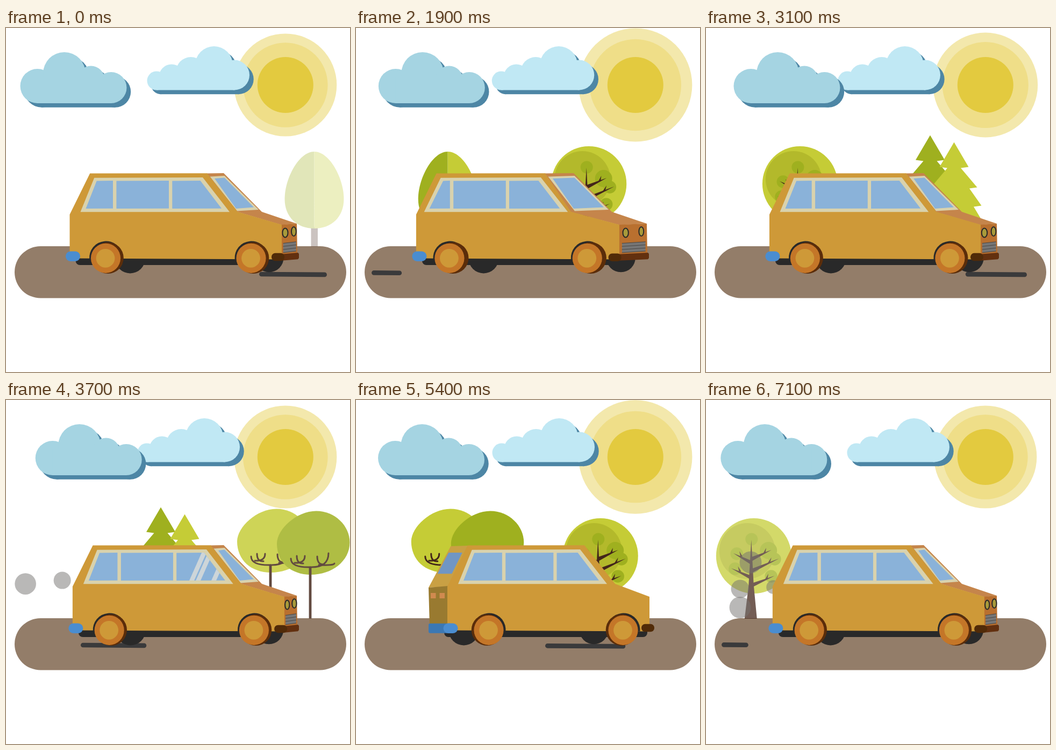
An HTML page with a canvas for the animation above (7.2 s loop, 640 by 640 pixels).

```html
<!DOCTYPE html>
<html lang="en">
<head>
<meta charset="utf-8">
<title>Road trip</title>
<style>
html, body { margin: 0; width: 100%; height: 100%; overflow: hidden; background: #fff; }
canvas { display: block; width: 640px; height: 640px; }
</style>
</head>
<body>
<canvas id="stage" width="640" height="640"></canvas>
<script>
const LOOP = 7200, STEP = 100, TAU = Math.PI * 2;
const stage = document.getElementById('stage').getContext('2d');
const layer = new OffscreenCanvas(640, 640).getContext('2d');
let g = stage;

const LEAF = '#9fb01f', LIME = '#c5cc36', BARK = '#43261a';
const PAINT = '#ce9938', GLASS = '#8ab2d9', CREAM = '#d9d2ad', BLACK = '#292929';

const clamp = (v, lo = 0, hi = 1) => Math.max(lo, Math.min(hi, v));
const smooth = v => (v = clamp(v), v * v * (3 - 2 * v));
const lerp = (a, b, k) => a + (b - a) * k;

// Piecewise linear track of [time, value] keys.
function track(keys, t) {
  const n = keys.findIndex(key => t < key[0]);
  if (n === 0) return keys[0][1];
  if (n < 0) return keys[keys.length - 1][1];
  const [t0, a] = keys[n - 1], [t1, b] = keys[n];
  return lerp(a, b, (t - t0) / (t1 - t0));
}

function disc(x, y, r, color) {
  g.fillStyle = color;
  g.beginPath();
  g.arc(x, y, r, 0, TAU);
  g.fill();
}
function outline(pts) {
  pts.forEach(([x, y], i) => i ? g.lineTo(x, y) : g.moveTo(x, y));
  g.closePath();
}
function poly(color, ...pts) {
  g.fillStyle = color;
  g.beginPath();
  outline(pts);
  g.fill();
}
function rect(x, y, w, h, color) {
  g.fillStyle = color;
  g.fillRect(x, y, w, h);
}
function pill(x, y, w, h, r, color) {
  g.fillStyle = color;
  g.beginPath();
  g.roundRect(x, y, w, h, r);
  g.fill();
}

// ---- sky ----
function sun(t) {
  const k = smooth(1 - Math.abs(t % 3600 - 1800) / 1800);
  disc(519.8, 106, 95.5 + 10.2 * k, '#f3e8ac');
  disc(519.8, 106, 78.8 + 6.5 * k, '#efde88');
  disc(519.8, 106, 52, '#e3ca3f');
}
function cloud(x, base, color, puffs) {
  const left = puffs[0][0], right = puffs[puffs.length - 1][0];
  for (const [d, fill] of [[7.7, '#4d86a5'], [0, color]]) {
    puffs.forEach(([px, py, r]) => disc(x + px + d, py + d, r, fill));
    rect(x + left + d, 92 + d, right - left, base - 92, fill);
  }
}
function clouds(t) {
  const k = 1 - Math.abs(t - 3600) / 3600;
  cloud(-18 * smooth(k), 115.5, '#c0e8f4',
    [[280, 98, 17.5], [308, 91, 23.5], [344, 82, 28], [387, 69, 35], [425, 87.5, 28]]);
  cloud(29 * k, 140, '#a5d4e2',
    [[58.5, 108, 32], [108.5, 84.5, 39.5], [158, 96, 25.5], [195.5, 111, 29]]);
}

// ---- road ----
function road(t) {
  pill(16, 406, 617, 96.5, 48.2, '#937d69');
  const beat = (t / 100 + 1.5) % 10.38 - 1.5;
  const head = track([[-1.5, 597], [0, 471], [7.8, 29]], beat) + 4.3;
  const tail = track([[0.6, 597], [9.5, 29]], beat) - 4.3;
  if (tail < head) return;
  g.strokeStyle = '#3a3a3b';
  g.lineWidth = 8.6;
  g.lineCap = 'round';
  g.beginPath();
  g.moveTo(head, 455.2 + head * 0.006);
  g.lineTo(tail, 455.3 + tail * 0.006);
  g.stroke();
}

// ---- trees, drawn around their own x origin ----
function eggTree() {
  rect(-6, 370, 12.5, 37, '#5b4236');
  for (const [w, color] of [[-55, LEAF], [55, LIME]]) {
    g.fillStyle = color;
    g.beginPath();
    g.moveTo(0, 230);
    g.bezierCurveTo(w * 0.52, 230, w, 280, w, 318);
    g.bezierCurveTo(w, 352, w * 0.58, 373, 0, 373);
    g.fill();
  }
}
function roundTree() {
  const boughs = [[318, 47, 295], [345, 39, 327], [296, 33, 279], [303, -38, 285], [331, -42, 313]];
  disc(0, 290, 70, LIME);
  disc(-12, 281, 52, '#b3b92b');
  disc(-4, 259, 11.5, LEAF);
  boughs.forEach(([root, x, y]) => disc(x * 0.83, y + 1, y < 280 ? 16 : 11.8, LEAF));
  poly(BARK, [-4.5, 260], [0, 345], [6, 407], [-17, 407], [-9.5, 345]);
  for (const [root, x, y] of boughs) {
    poly(BARK, [-4, root - 4], [x, y], [-4, root + 4]);
    const tx = x * 0.6, ty = lerp(root, y, 0.65);
    poly(BARK, [tx - 2, ty], [tx + x * 0.1, ty - 10], [tx + 2, ty]);
  }
}
function pine(x, y, color) {
  const right = [[0, 0]];
  for (const [w, h] of [[27, 46], [43, 84], [51, 118], [66, 169]])
    right.push([w, h], [w - 14.5, h + (h < 169 ? 2 : 0)]);
  const left = right.map(([a, b]) => [-a, b]).reverse();
  poly(color, ...right.concat(left).map(([a, b]) => [x + a, y + b]));
  rect(x - 4.8, 369.5, 9.6, 37, BARK);
}
function pines() {
  pine(0, 199.5, LEAF);
  pine(44.5, 212.5, LIME);
}
function bushTree(x, y, color) {
  g.save();
  g.translate(x, y);
  g.fillStyle = color;
  g.beginPath();
  g.moveTo(-62, 267);
  g.bezierCurveTo(-62, 240, -25, 206.5, 11, 206.5);
  g.bezierCurveTo(46, 206.5, 73.5, 234, 73.5, 265);
  g.bezierCurveTo(73.5, 300, 40, 325, 1, 325);
  g.bezierCurveTo(-36, 325, -62, 302, -62, 267);
  g.fill();
  g.strokeStyle = BARK;
  g.lineCap = 'round';
  g.lineWidth = 3;
  const limb = (x0, y0, x1, y1) => {
    g.beginPath();
    g.moveTo(x0, y0);
    g.quadraticCurveTo(x0, y1 + 1, x1, y1);
    g.stroke();
  };
  limb(-36, 295, 0, 311);
  limb(-25, 290, -13, 304);
  limb(-10, 290, -29, 303);
  limb(34, 285, 0, 311);
  limb(13, 291, 26, 306);
  limb(45, 304, 16, 307);
  rect(-2.4, 311, 4.8, 95.5 - y, BARK);
  g.restore();
}
function bushes() {
  bushTree(-74, -4, LIME);
  bushTree(0, 0, LEAF);
}

// One tree every 1200 ms: drawing, entry x, pixels per ms.
const trees = [[eggTree, 594.7, 0.212], [roundTree, 605.5, 0.2153], [pines, 589, 0.215],
  [bushes, 604.5, 0.1925], [roundTree, 605.5, 0.2153]];

function scenery(t) {
  trees.forEach(([draw, x, speed], n) => {
    const age = (t + 100 - n * 1200 + LOOP) % LOOP;
    if (age >= 2500) return;
    g = layer;
    g.clearRect(0, 0, 640, 640);
    g.save();
    g.translate(x - age * speed, 0);
    draw();
    g.restore();
    g = stage;
    g.globalAlpha = Math.min(smooth(age / 270), smooth((2600 - age) / 300));
    g.drawImage(layer.canvas, 0, 0);
    g.globalAlpha = 1;
  });
}

// ---- exhaust: final [x, y, radius] of each puff ----
const pair = [[29.5, 340, 20.5], [98, 333.5, 16.7]];
const group = [[83, 302, 20.5], [63.5, 351.5, 17], [63.5, 386, 20], [125, 348, 12.8]];

function smoke(t) {
  for (const [end, puffs] of [[1300, pair], [3750, pair], [6100, pair], [7100, group]]) {
    const back = (end - t) / 600;
    if (back < 0 || back >= 1) continue;
    for (const [x, y, r] of puffs)
      disc(x + 80 * back, y + 25 * back, r - 8 * back, 'rgba(117,115,112,.5)');
  }
}

// ---- van ----
// Turn: 1 shows the front, 0 is at rest, -1 is a plain side view, -2 shows the rear.
function turnAt(t) {
  return t < 3600
    ? track([[0, 0], [1300, 1], [1800, 0.75], [2500, 0.12], [3600, 0]], t)
    : -track([[0, 0], [100, 0.13], [1100, 1], [1800, 2]], 1800 - Math.abs(t - 5400));
}

function rearFace(back, roof, open) {
  const edge = back - 35 * open, top = roof - 31.5 * open;
  const inside = (k, h) => [lerp(lerp(edge, back, k), lerp(top, roof, k), h), 348 - 77 * h];
  poly('#c9a044', [edge, 349], [top, 272], [roof, 271], [back + 1, 347]);
  poly('#997a30', [edge, 349], [back + 1, 346], [back + 1, 430], [edge + 2, 420]);
  poly('#7096c4', inside(0.1, 0.83), inside(0.89, 0.83), inside(0.89, 0.32), inside(0.1, 0.32));
  for (const x of [4, 20.5]) rect(edge + x * open, 359, 9.5 * open, 10, '#d08a4f');
}

function frontFace(nose, far, roof, hood, front) {
  const top = Math.max(roof, 405), base = Math.max(hood, 476), width = far - nose;
  const corner = hood - 1 + 12 * front;
  poly('#c5854b', [roof - 1, 270.5], [top, 270], [base, 342], [far, 364], [nose, 366.5], [hood - 1, 342]);
  poly(CREAM, [roof + 5.5, 276.5], [top + 1.5, 275], [base - 6, 338], [corner, 340.5]);
  poly(GLASS, [roof + 14, 280], [top + 1.5, 278.4], [base - 15, 333.5], [corner - 2, 336]);
  poly('#b9702f', [nose - 1, 366], [far, 364], [far + 1, 418], [nose - 1, 430]);

  const gl = nose + width * 0.1, gr = nose + width * 0.95;
  poly('#767676', [gl, 400.5], [gr, 397.5], [gr, 415.5], [gl, 418]);
  g.strokeStyle = '#45413e';
  g.lineWidth = 0.9;
  g.beginPath();
  for (let y = 0; y < 18; y += 5.8) {
    g.moveTo(gl, 400.5 + y);
    g.lineTo(gr, 397.7 + y);
  }
  g.stroke();
  g.strokeStyle = BLACK;
  g.lineWidth = 2;
  g.fillStyle = '#a89a3a';
  for (const [k, y, r] of [[0.23, 381, 5.2], [0.8, 378.5, 4.4]]) {
    g.beginPath();
    g.ellipse(nose + width * k, y, Math.min(r, width * 0.18), 8.6, 0, 0, TAU);
    g.fill();
    g.stroke();
  }
}

function sideWindows(t, back, roofA, roofB, hood, front, swing) {
  const tl = roofA + 8, tr = roofB - 8;
  const bl = back + 20 - 8 * front, br = hood - 15 + 14 * front;
  poly(CREAM, [tl, 278.7], [tr, 278], [br, 342.2], [bl, 342.2]);

  const left = bl + 10, right = br - 15;
  const bar1 = lerp(left, right, 0.2 - 0.085 * swing), bar2 = lerp(left, right, 0.612 - 0.052 * swing);
  const pane = (a, b, c, d) => [[a, 284.5], [b, 284], [c, 335.8], [d, 336]];
  const panes = [pane(tl + 4.5, bar1, bar1, left), pane(bar1 + 6.4, bar2, bar2, bar1 + 6.4),
    pane(bar2 + 6.2, tr - 4.5, right, bar2 + 6.2)];
  panes.forEach(p => poly(GLASS, ...p));

  // reflection sweeping across the glass
  if (Math.abs(t - 3700) > 300) return;
  g.save();
  g.beginPath();
  panes.forEach(outline);
  g.clip();
  for (const dx of [0, 12, 41]) {
    const x = 341 + dx + (t - 3700) * 0.8;
    poly('#cdd5d9', [x, 336], [x + 23.5, 283], [x + 32.5, 283], [x + 9, 336]);
  }
  g.restore();
}

function wheel(x, lean) {
  g.fillStyle = BLACK;
  g.beginPath();
  g.arc(x + 1, 427.5, 31, Math.PI * 0.97, Math.PI * 2.03);
  g.fill();
  disc(x + lean, 427.8, 29.3, '#5b2d0a');
  disc(x + 0.5, 428.3, 27.6, '#c47628');
  disc(x, 428.3, 17.4, PAINT);
}

function van(t) {
  const turn = turnAt(t), front = Math.max(turn, 0), swing = clamp(turn, -1, 0.5);
  const open = clamp(-1 - turn);
  const i = Math.min(2, Math.floor(1 - turn));
  const view = (...x) => lerp(x[i], x[i + 1], 1 - turn - i);

  // outline corners in the front, rest, side and rear views
  const back = view(108.5, 118.5, 159.7, 170), nose = view(478, 513, 550.5, 546);
  const roofB = view(340.5, 374, 427, 425), hood = view(384, 431, 483, 482);
  const roofA = back + 37.7, far = Math.max(nose, 541);
  const rearWheel = back + 66.5 - 10 * swing, frontWheel = nose - 57.5 - 4 * turn;
  const bump = (at, deg) => deg * smooth(1 - Math.abs(t - at) / 350);

  g.save();
  g.translate(300, 410);
  g.rotate(-(bump(2500, 1.2) + bump(4700, 0.9)) * Math.PI / 180);
  g.translate(-300, -410);

  pill(back + 11 - 17 * open, 424, nose - back - 15 + 17 * open, 17, 8, BLACK);
  disc(rearWheel + Math.min(64, 46 + 46 * turn), 428.5, 28, BLACK);
  disc(frontWheel + 34 + 44 * turn, 427.3, 27, BLACK);

  if (open > 0) rearFace(back, roofA, open);
  if (turn > -0.95) frontFace(nose, far, roofB, hood, front);

  poly(PAINT, [back, 347], [roofA, 270.5], [roofB, 270.3], [hood, 342], [nose, 366],
    [nose, 430.5], [back, 428.5]);
  sideWindows(t, back, roofA, roofB, hood, front, swing);
  wheel(rearWheel, 4.5 + 3.5 * turn);
  wheel(frontWheel, 4.5 + 3.5 * turn);

  const bumper = nose - 19 - 2 * turn;
  if (turn > -0.95)
    poly('#63300f', [bumper + 16, 421], [far + 2, 418], [far + 4, 420], [far + 4, 428],
      [far + 2, 430.3], [bumper + 16, 433]);
  pill(bumper, 418.8 + turn, 24, 14.5, 7, '#512b08');
  if (open > 0) pill(back - 35 * open, 415.7, 35 * open + 9, 18, 3, '#3b78b4');
  pill(back - 7.5, 415.6, 27, 18.3, 9, '#4a8dd0');
  g.restore();
}

const begin = performance.now();
function tick() {
  const t = Math.floor((performance.now() - begin) % LOOP / STEP) * STEP;
  rect(0, 0, 640, 640, '#fff');
  [sun, clouds, road, scenery, smoke, van].forEach(draw => draw(t));
  requestAnimationFrame(tick);
}
tick();
</script>
</body>
</html>
```
